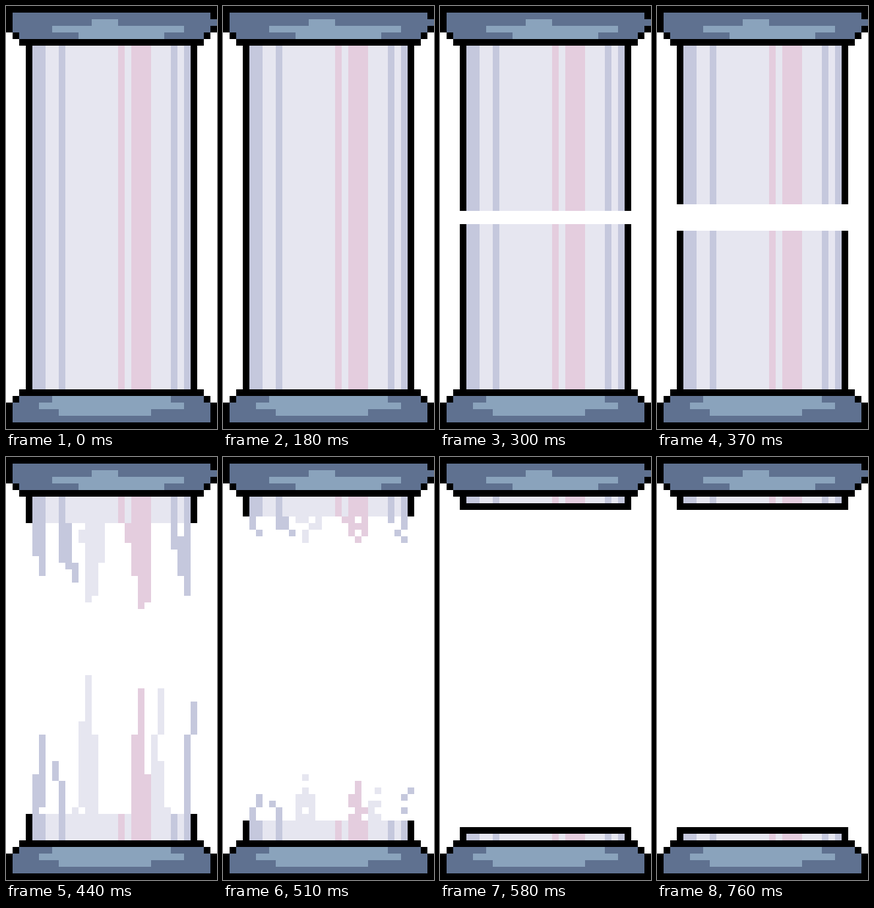
Write an HTML page with a canvas that moves like this. It is 320 by 640 pixels and loops after 880 ms.

```html
<!DOCTYPE html>
<html lang="en">
<head>
<meta charset="utf-8">
<title>Dissolving column</title>
<style>
html, body { margin: 0; height: 100%; overflow: hidden; background: #fff; }
canvas { display: block; }
</style>
</head>
<body>
<canvas width="320" height="640"></canvas>
<script>
const ctx = document.querySelector('canvas').getContext('2d');
ctx.scale(10, 10);

const BLACK = '#000', WHITE = '#fff', SLATE = '#5f7190', SHINE = '#8aa3bc';
const PALE = '#e6e6f0', LILAC = '#c5c8dd', PINK = '#e4cdde';

// Each rectangle is [x, y, width, height] in 10px cells.
function fill(color, ...rects) {
  ctx.fillStyle = color;
  for (const r of rects) ctx.fillRect(...r);
}

function band(top, bottom) {
  const h = bottom - top;
  const stripe = ([x, w]) => [x, top, w, h];
  fill(BLACK, [3, top, 26, h]);
  fill(PALE, [4, top, 24, h]);
  fill(LILAC, ...[[4, 2], [8, 1], [25, 1], [27, 1]].map(stripe));
  fill(PINK, ...[[17, 1], [19, 3]].map(stripe));
}

function halves(size) {
  band(6, 6 + size);
  band(58 - size, 58);
}

function caps() {
  fill(BLACK, [0, 0, 32, 4], [1, 4, 30, 1], [2, 5, 28, 1],
    [2, 58, 28, 1], [1, 59, 30, 1], [0, 60, 32, 4]);
  fill(SLATE, [1, 1, 30, 3], [31, 2, 1, 1], [2, 4, 28, 1],
    [2, 59, 28, 1], [1, 60, 30, 3]);
  fill(SHINE, [13, 2, 4, 1], [7, 3, 20, 1], [11, 4, 13, 1],
    [7, 59, 18, 1], [5, 60, 22, 1], [8, 61, 14, 1]);
}

function drips() {
  halves(4);
  fill(LILAC, [4, 10, 2, 5], [5, 15, 1, 3], [8, 10, 2, 6], [9, 16, 2, 1], [10, 17, 1, 2],
    [25, 10, 1, 4], [26, 12, 1, 6], [27, 10, 1, 11],
    [5, 42, 1, 11], [4, 48, 1, 6], [7, 46, 1, 3], [8, 49, 1, 5],
    [28, 37, 1, 5], [27, 42, 1, 12]);
  fill(PALE, [12, 10, 3, 6], [11, 11, 1, 2], [12, 16, 2, 5], [12, 21, 1, 1],
    [12, 33, 1, 21], [11, 40, 1, 13], [13, 42, 1, 12], [10, 53, 1, 1],
    [23, 35, 1, 7], [22, 42, 1, 12], [23, 46, 1, 8], [24, 53, 1, 1]);
  fill(PINK, [18, 10, 1, 3], [19, 10, 3, 8], [20, 18, 2, 4], [20, 22, 1, 1],
    [20, 35, 1, 19], [19, 42, 1, 12], [21, 48, 1, 6]);
}

function crumbs() {
  halves(3);
  fill(LILAC, [4, 9, 1, 2], [5, 11, 1, 1], [8, 9, 2, 2], [10, 11, 1, 1],
    [25, 9, 1, 1], [27, 9, 1, 2], [26, 11, 1, 1], [27, 12, 1, 1],
    [5, 51, 1, 2], [4, 53, 1, 2], [7, 52, 1, 1], [8, 53, 1, 2],
    [28, 50, 1, 1], [27, 51, 1, 1], [27, 53, 1, 1]);
  fill(PALE, [11, 9, 2, 1], [14, 9, 1, 1], [13, 10, 2, 1], [12, 11, 1, 2],
    [12, 48, 1, 1], [12, 50, 1, 1], [11, 51, 3, 4],
    [23, 50, 1, 1], [22, 52, 2, 1], [22, 53, 1, 1], [22, 54, 2, 1]);
  fill(PINK, [18, 9, 1, 1], [19, 9, 3, 3], [20, 12, 1, 1],
    [20, 49, 1, 2], [19, 51, 2, 2], [20, 53, 2, 1], [19, 54, 2, 1]);
  fill(WHITE, [20, 9, 1, 1], [20, 11, 1, 1], [12, 53, 1, 1]);
}

function stubs() {
  fill(BLACK, [3, 6, 26, 2], [3, 56, 26, 2]);
  halves(1);
}

// Each pose holds until its end time in ms.
const poses = [
  [300, () => band(6, 58)],
  [370, () => halves(25)],
  [440, () => halves(24)],
  [510, drips],
  [580, crumbs],
  [880, stubs],
];

const start = performance.now();
function frame() {
  const t = (performance.now() - start) % 880;
  fill(WHITE, [0, 0, 32, 64]);
  caps();
  poses.find(([end]) => t < end)[1]();
  requestAnimationFrame(frame);
}
frame();
</script>
</body>
</html>
```
